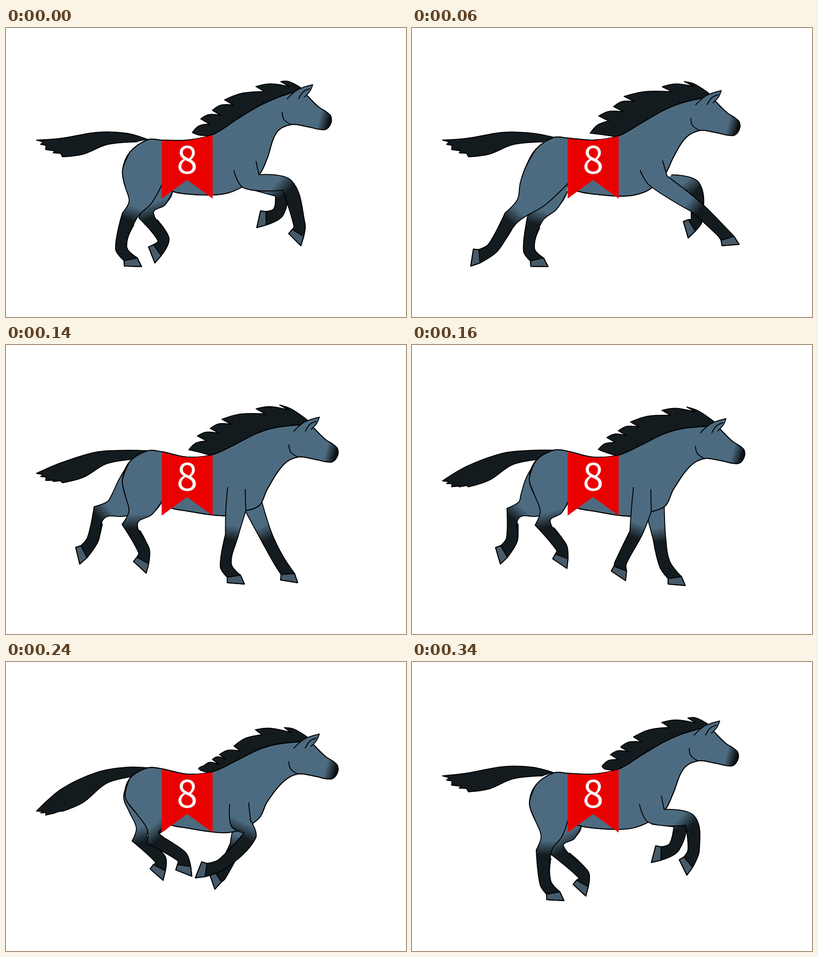
Recreate the animation shown at these times as an HTML page with a canvas. Size 879 by 637 pixels, loop 0.36 s.

```html
<!DOCTYPE html>
<html lang="en">
<head>
<meta charset="utf-8">
<title>Galloping horse</title>
<style>
  html, body { margin: 0; width: 100%; height: 100%; overflow: hidden; background: #fff; }
  canvas { display: block; }
</style>
</head>
<body>
<canvas id="stage" width="879" height="637"></canvas>
<script>
const ctx = document.getElementById('stage').getContext('2d');
const LOOP = 360, STEP = 20;
const TIMES = [0, 60, 100, 140, 200, 280, 340];
const COAT = '#4d6b80', DARK = '#131b1f', HOOF = '#465a69', RED = '#eb0000';

// Joint positions at the key times; everything else follows from them.
const LEGS = {
  nearHind: {
    knee: [[272, 413], [218, 418], [245, 396], [272, 395], [313, 389], [322, 392], [290, 415]],
    fetlock: [[253, 484], [178, 484], [248, 464], [303, 453], [369, 434], [381, 434], [293, 486]],
    toe: [[298, 526], [129, 525], [220, 515], [308, 503], [388, 474], [407, 481], [334, 526]]
  },
  farHind: {
    knee: [[308, 413], [270, 421], [217, 400], [205, 369], [266, 384], [312, 394], [318, 414]],
    fetlock: [[346, 466], [257, 488], [194, 469], [191, 428], [291, 440], [374, 434], [377, 469]],
    toe: [[327, 518], [299, 526], [171, 525], [162, 483], [278, 493], [394, 474], [382, 516]]
  },
  nearFore: {
    knee: [[618, 347], [625, 395], [545, 412], [496, 420], [504, 398], [572, 368], [611, 350]],
    fetlock: [[645, 434], [680, 448], [557, 472], [483, 485], [437, 461], [532, 431], [619, 414]],
    toe: [[648, 480], [719, 477], [589, 526], [524, 527], [380, 499], [489, 458], [604, 470]]
  },
  farFore: {
    knee: [[603, 362], [620, 350], [592, 373], [571, 420], [494, 418], [535, 390], [588, 357]],
    fetlock: [[599, 405], [626, 422], [633, 446], [598, 472], [475, 494], [495, 442], [576, 408]],
    toe: [[551, 440], [607, 463], [676, 488], [641, 524], [515, 528], [434, 469], [526, 442]]
  }
};
// How far the head and the tail tip have sunk
const SINK = [[0, 0], [13, 0], [24, 3], [34, 36], [40, 78], [24, 70], [5, 4]];
// Mane tips from withers to ears, streaming and hanging
const STREAMING = [[390, 232], [409, 192], [442, 170], [465, 146], [550, 124], [598, 111]];
const HANGING = [[437, 228], [455, 212], [470, 198], [502, 176], [548, 136], [612, 128]];
// Profile from forehead to throat, relative to the ear tip
const PROFILE = [[-13, 23, true], [13, 49], [30, 60], [40, 70], [39, 87], [26, 99], [-10, 93], [-47, 88], [-79, 105]];

const mix = (a, b, k = 0.5) => [a[0] + (b[0] - a[0]) * k, a[1] + (b[1] - a[1]) * k];
const shift = ([x, y], dx, dy) => [x + dx, y + dy];
const sharp = p => [p[0], p[1], true];
const around = (p, offsets) => offsets.map(([dx, dy, corner]) => [p[0] + dx, p[1] + dy, corner]);
const direction = (a, b) => {
  const length = Math.hypot(b[0] - a[0], b[1] - a[1]) || 1;
  return [(b[0] - a[0]) / length, (b[1] - a[1]) / length];
};
// Rear and front edge of a limb of half width w that runs along d
const edges = (p, [dx, dy], w) => [shift(p, -dy * w, dx * w), shift(p, dy * w, -dx * w)];

// Cyclic cubic interpolation between the key poses.
function pose(keys, t) {
  const n = TIMES.length;
  const i = TIMES.findLastIndex(time => time <= t);
  const time = k => TIMES[(k + n) % n] + LOOP * Math.floor(k / n);
  const span = time(i + 1) - time(i), u = (t - time(i)) / span, v = 1 - u;
  return [0, 1].map(axis => {
    const value = k => keys[(k + n) % n][axis];
    const slope = k => (value(k + 1) - value(k - 1)) / (time(k + 1) - time(k - 1)) * span;
    return value(i) * v * v * (1 + 2 * u) + value(i + 1) * u * u * (3 - 2 * u)
      + slope(i) * u * v * v - slope(i + 1) * u * u * v;
  });
}

// Smooth path through the points; corners and ends get no handles.
function curve(points) {
  const path = new Path2D();
  const handle = (i, length) => {
    const a = points[i - 1], p = points[i], b = points[i + 1];
    if (!a || !b || p[2]) return p;
    const [dx, dy] = direction(a, b);
    return shift(p, dx * length, dy * length);
  };
  path.moveTo(points[0][0], points[0][1]);
  for (let i = 1; i < points.length; i++) {
    const p = points[i], q = points[i - 1];
    const reach = Math.hypot(p[0] - q[0], p[1] - q[1]) * 0.34;
    path.bezierCurveTo(...handle(i - 1, reach).slice(0, 2), ...handle(i, -reach).slice(0, 2), p[0], p[1]);
  }
  return path;
}

function paint(points, fill) {
  const path = curve(points);
  if (fill) {
    ctx.fillStyle = fill;
    ctx.fill(path);
  }
  ctx.stroke(path);
  return path;
}

function joints(leg, t) {
  return { knee: pose(leg.knee, t), fetlock: pose(leg.fetlock, t), toe: pose(leg.toe, t) };
}

// The sole keeps a fixed angle to the pastern.
function hoofShape({ fetlock, toe }) {
  const angle = Math.atan2(toe[1] - fetlock[1], toe[0] - fetlock[0]) - 0.72;
  const c = Math.cos(angle), s = Math.sin(angle);
  return [[-39, 12], [-38, 0], [0, 0], [-10, 19]]
    .map(([x, y]) => [toe[0] + c * x + s * y, toe[1] + s * x - c * y, true]);
}

// `build` turns the knee edges into the thigh's rear, front and hidden points.
function drawLeg(leg, root, kneeWidth, build) {
  const { knee, fetlock, toe } = leg;
  const axis = direction(root, fetlock);
  const [kneeRear, kneeFront] = edges(knee, axis, kneeWidth);
  const [fetRear, fetFront] = edges(fetlock, direction(knee, toe), 12.5);
  const hoof = hoofShape(leg);
  const { rear, front, hidden } = build(kneeRear, kneeFront);
  const outline = [...rear, sharp(kneeRear), fetRear, ...hoof, fetFront, kneeFront, ...front];

  const shade = ctx.createLinearGradient(...shift(knee, -axis[0] * 22, -axis[1] * 22),
    ...shift(knee, axis[0] * 10, axis[1] * 10));
  shade.addColorStop(0, COAT);
  shade.addColorStop(1, DARK);
  ctx.fillStyle = shade;
  ctx.fill(curve([...outline, ...hidden.map(sharp)]));
  ctx.fillStyle = DARK;
  ctx.fill(curve([mix(kneeRear, fetRear, 0.25), fetRear, ...hoof, fetFront, mix(kneeFront, fetFront, 0.25)]));
  paint([...hoof, hoof[0]], HOOF);
  paint(outline);
}

// The rump's rear edge gives way to the knee.
function haunch({ knee }, nod) {
  const swing = knee[0] - 272;
  return [
    [262 + swing * 0.45, 350 - nod * 0.55],
    [256 + swing * 0.12, 314 - nod * 0.5],
    [272, 274 - nod * 0.5]
  ];
}

function drawHind(leg, nod, flank) {
  const [low, mid, high] = haunch(leg, nod);
  drawLeg(leg, [300, 330], 17, (kneeRear, kneeFront) => ({
    rear: [high, mid, low, shift(mix(low, kneeRear, 0.55), 12, 0)],
    front: [shift(mix(kneeFront, flank), 4, 6), flank],
    hidden: [[330, 285]]
  }));
}

function shoulder({ knee }, offset = 0) {
  const x = 523 + (knee[0] - 560) * 0.28;
  return [x + offset, 336 + (542 - x) * 0.75];
}

function drawFore(leg, offset, lines) {
  const root = shoulder(leg, offset);
  const [dx, dy] = direction(root, leg.knee);
  const [rear, front] = edges(root, direction([0, 0], [dx, dy + 1]), 22);
  drawLeg(leg, root, 14, () => ({
    rear: [...lines.slice(0, 1), rear],
    front: [sharp(front), ...lines.slice(1)],
    hidden: []
  }));
}

function drawTail(dock, drop) {
  const tip = [67, 247 + drop], under = [87, 268 + drop * 0.85], bulge = [124, 284 + drop * 0.55];
  const teeth = (a, b) => [shift(mix(a, b, 0.3), 9, -2), mix(a, b, 0.45), shift(mix(a, b, 0.7), 7, -3)];
  const fringe = [tip, ...teeth(tip, under), under, ...teeth(under, bulge), bulge].map(sharp);
  paint([dock, [265, 232], [200, 230 + drop * 0.16], [122, 243 + drop * 0.45], ...fringe,
    [170, 278 + drop * 0.38], [222, 257 + drop * 0.12], [288, 251]], DARK);
}

function drawMane(withers, earTip, nod, t) {
  const hang = (1 + Math.cos((t - 260) / LOOP * 2 * Math.PI)) / 2;
  const tips = STREAMING.map((p, i) => shift(mix(p, HANGING[i], hang), 0, nod * i / 10));
  const end = shift(earTip, -27, 6);
  const locks = tips.flatMap((tip, i) => {
    const next = tips[i + 1];
    const valley = next ? shift(next, 22 - hang * 8, 11) : end;
    return [sharp(tip), shift(mix(tip, valley, 0.45), -2, -6), sharp(valley)];
  });
  paint([shift(withers, 0, 3), [424, 236], ...locks, shift(earTip, -30, 26)], DARK);
}

function drawBody(points, [x, y]) {
  const path = paint(points, COAT);
  const shade = ctx.createLinearGradient(x + 13, y + 80, x + 35, y + 86);
  shade.addColorStop(0, 'rgba(11,15,18,0)');
  shade.addColorStop(1, '#0b0f12');
  ctx.save();
  ctx.clip(path);
  ctx.fillStyle = shade;
  ctx.fillRect(x, y + 50, 60, 60);
  ctx.restore();
  ctx.stroke(path);
}

function drawFace(tip) {
  paint(around(tip, [[-56, 31], [-33, 11], [0, 0, true], [-6, 14], [-18, 27]]), COAT);
  paint(around(tip, [[-31, 31], [-21, 16], [-7, 9]]));
  paint(around(tip, [[-67, 61], [-63, 77], [-47, 88]]));
}

function drawBanner(edge) {
  const path = curve(edge.map(p => shift(p, 0, 1)));
  path.lineTo(454, 376);
  path.lineTo(398, 335);
  path.lineTo(342, 376);
  ctx.fillStyle = RED;
  ctx.fill(path);
  ctx.fillStyle = '#f6f6f6';
  ctx.font = '500 83px "Noto Sans CJK JP", "Noto Sans CJK SC", Roboto, sans-serif';
  ctx.textAlign = 'center';
  ctx.fillText('8', 398, 321);
}

function draw(t) {
  const [nod, drop] = pose(SINK, t);
  const [nearHind, farHind, nearFore, farFore] = Object.values(LEGS).map(leg => joints(leg, t));
  const earTip = [674 + nod * 0.43, 125 + nod];
  const [chestX, chestY] = shoulder(nearFore);
  const sag = (chestY - 336) * 1.2;
  const back = [
    [312, 246 - nod * 0.38], [342, 247 - nod * 0.35], [398, 247], [454, 235 + nod * 0.2],
    [505, 203 + nod * 0.45], [550, 175 + nod * 0.6], [590, 156 + nod * 0.78], sharp(shift(earTip, -45, 17))
  ];
  const belly = [
    [574, 285 + sag], [557, 320 + sag], [523, 348 + nod * 0.55], [490, 363 + nod * 0.38],
    [454, 368 + nod * 0.2], [398, 366], [365, 360], [335, 346]
  ];
  ctx.fillStyle = '#fff';
  ctx.fillRect(0, 0, 879, 637);
  ctx.strokeStyle = '#000';
  ctx.lineWidth = 2;
  ctx.lineJoin = ctx.lineCap = 'round';

  drawTail(back[0], drop);
  drawMane(back[3], earTip, nod, t);
  drawHind(farHind, nod, [366 + (farHind.knee[0] - 308) * 0.65, 361]);
  drawFore(farFore, 14, []);
  drawBody([...haunch(nearHind, nod), ...back, ...around(earTip, PROFILE), ...belly], earTip);
  drawHind(nearHind, nod, [345, 340]);
  drawFore(nearFore, 0, [
    [285 + chestX * 0.4, 314],
    [172 + chestX * 0.7, 293 + (541 - chestX) * 0.7]
  ]);
  drawFace(earTip);
  drawBanner(back.slice(1, 4));
}

function tick() {
  draw(Math.floor(performance.now() % LOOP / STEP) * STEP);
  requestAnimationFrame(tick);
}
tick();
</script>
</body>
</html>
```
